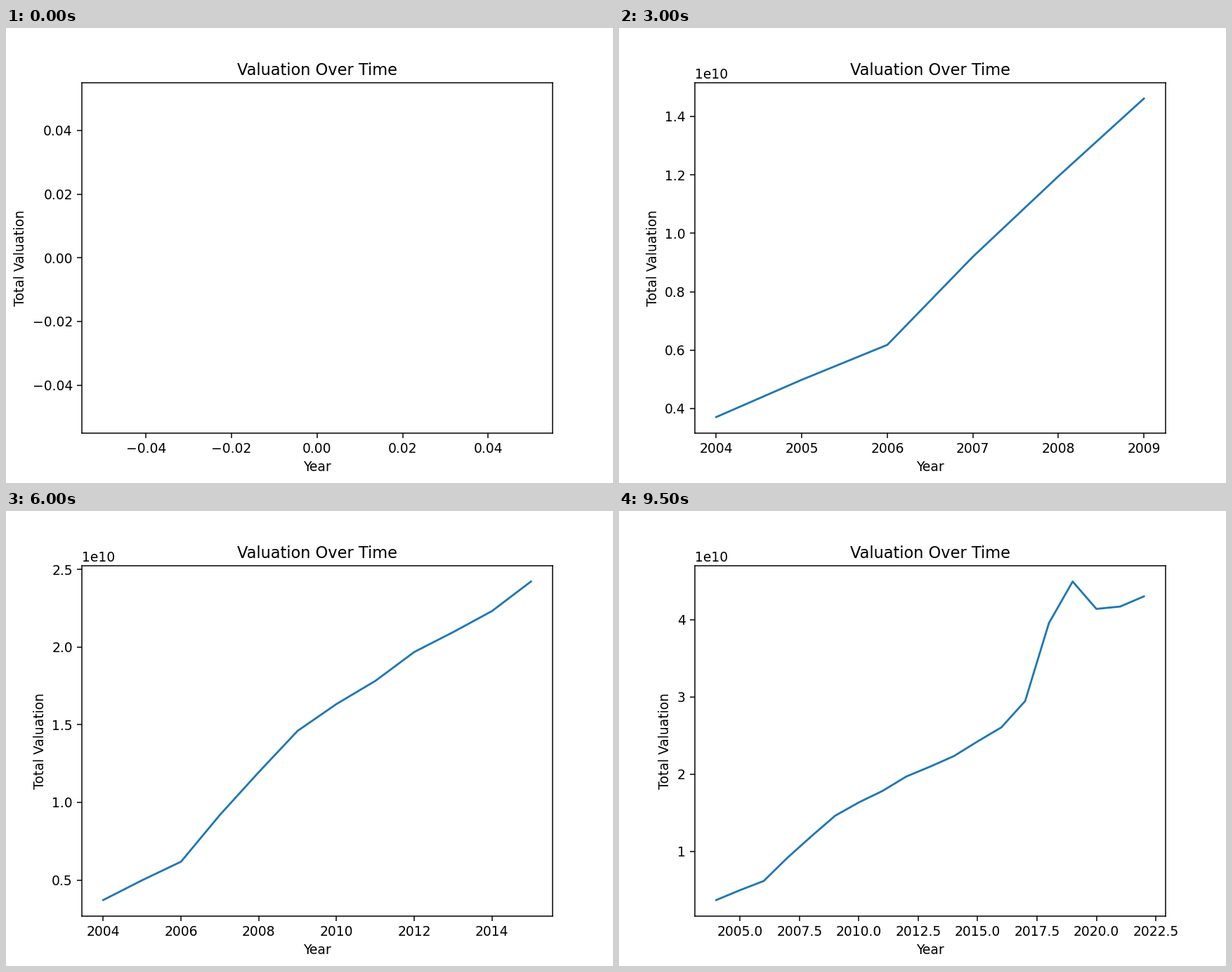
These frames come from a looping animation (864x648 px, 10000 ms). A matplotlib script:

```python
import matplotlib.pyplot as plt
import numpy as np
from matplotlib.animation import FuncAnimation

BILLION = 1e9
valuations = BILLION * np.array([
    3.71, 4.985, 6.18, 9.194, 11.95, 14.61, 16.34, 17.83, 19.69, 20.97,
    22.33, 24.23, 26.05, 29.45, 39.53, 44.92, 41.38, 41.68, 43.0,
])
years = np.arange(2004, 2004 + len(valuations))

fig, ax = plt.subplots(figsize=(6.4, 4.8), dpi=135)


def draw(count):
    """Plot the first `count` years on freshly scaled axes."""
    ax.clear()
    ax.plot(years[:count], valuations[:count])
    ax.set_title("Valuation Over Time")
    ax.set_xlabel("Year")
    ax.set_ylabel("Total Valuation")


anim = FuncAnimation(fig, draw, frames=len(years) + 1, interval=500,
                     repeat=True, repeat_delay=0)
plt.show()
```
